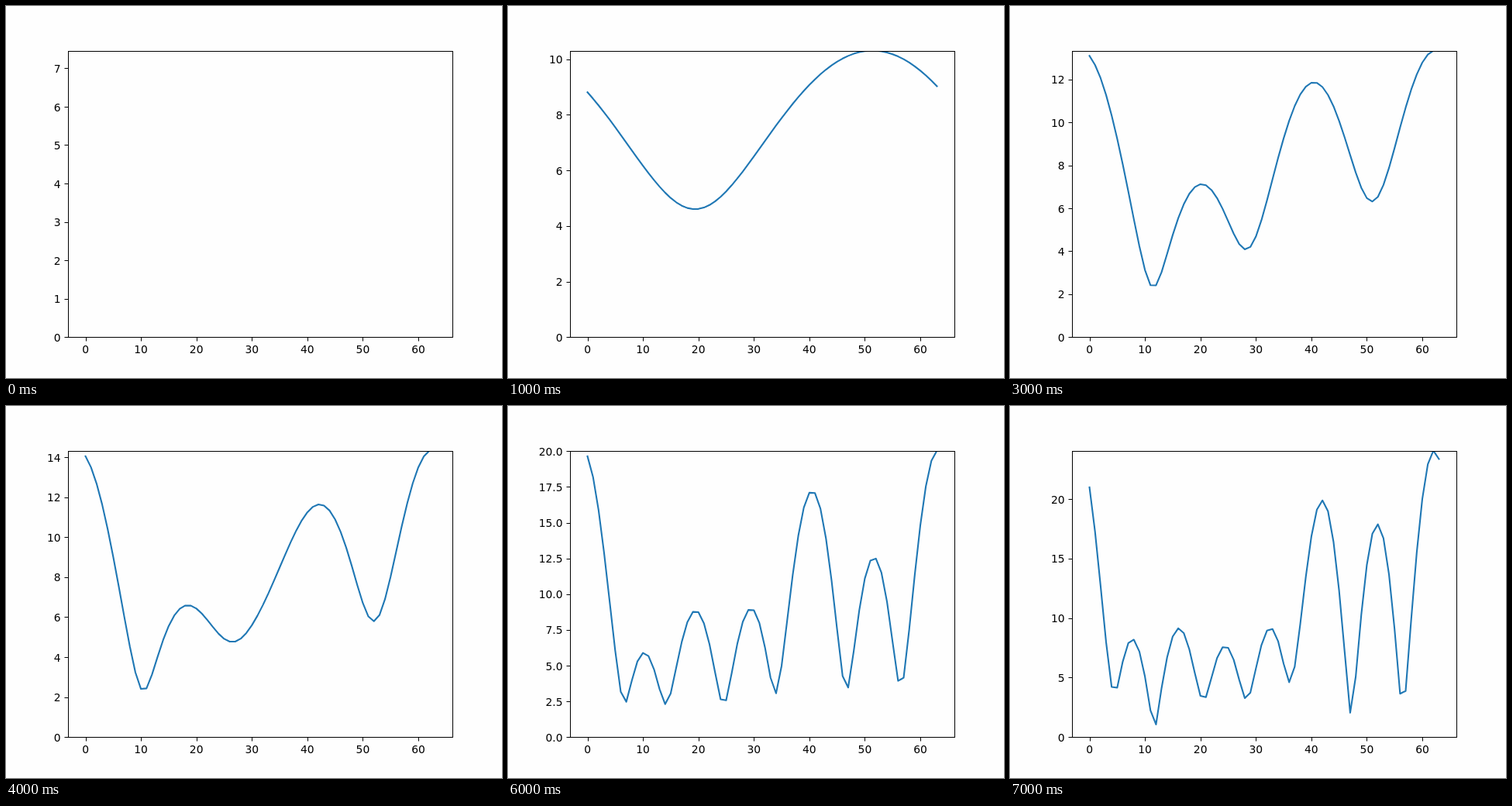
These frames come from a looping animation (640x480 px, 8000 ms). An HTML page:

```html
<!DOCTYPE html>
<html lang="en">
<head>
<meta charset="utf-8">
<title>Growing spectrum</title>
<style>
  html, body { margin: 0; width: 100%; height: 100%; overflow: hidden; background: #fefefe; }
  svg { display: block; width: 640px; height: 480px; }
  text { font: 13.889px "DejaVu Sans", sans-serif; fill: #000; }
  .axis { fill: none; stroke: #000; stroke-width: 1; }
  .curve { fill: none; stroke: #1f77b4; stroke-width: 2.083; stroke-linejoin: round; stroke-linecap: square; }
  .step { visibility: hidden; animation: show 8s step-end infinite; }
  @keyframes show {
    0% { visibility: visible; }
    12.5%, 100% { visibility: hidden; }
  }
</style>
</head>
<body>
<svg id="plot" viewBox="0 0 640 480">
  <clipPath id="area"><rect x="80" y="58" width="496" height="369"/></clipPath>
</svg>
<script>
const LEFT = 80, RIGHT = 576, TOP = 57.6, BOTTOM = 427.2;
const POINTS = 64, TICK = 5;

// Complex samples [re, im]; each second one more enters the padded DFT.
const samples = [
  [7.46, 0], [0.932, -2.698], [1.15, -0.157], [2.795, -1.54],
  [0.77, -0.653], [2.115, 0.634], [2.678, -3.678], [-1.635, -5.168]
];

const plot = document.getElementById('plot');
const snap = v => Math.round(v) + 0.5;
const xAt = k => LEFT + (RIGHT - LEFT) * (0.5 + k / (POINTS - 1)) / 11 * 10 / 1
  - (RIGHT - LEFT) * (0.5 * 10 / 11 - 0.5 / 11);

function add(parent, tag, attrs, text) {
  const el = document.createElementNS('http://www.w3.org/2000/svg', tag);
  for (const name in attrs) el.setAttribute(name, attrs[name]);
  if (text !== undefined) el.textContent = text;
  parent.appendChild(el);
  return el;
}

function magnitude(k, count) {
  let re = 0, im = 0;
  for (let m = 0; m < count; m++) {
    const angle = -2 * Math.PI * k * m / POINTS;
    const c = Math.cos(angle), s = Math.sin(angle);
    re += samples[m][0] * c - samples[m][1] * s;
    im += samples[m][0] * s + samples[m][1] * c;
  }
  return Math.hypot(re, im);
}

// Smallest round step that gives at most nine intervals.
const tickStep = max => [1, 2, 2.5, 5, 10].find(step => step >= max / 9);

function drawStep(count) {
  const group = add(plot, 'g', { class: 'step', style: `animation-delay:${count - 1}s` });
  const values = Array.from({ length: POINTS }, (_, k) => magnitude(k, count));
  const max = Math.max(...values);
  const yAt = v => BOTTOM - (BOTTOM - TOP) * v / max;

  const points = values.map((v, k) => `${xAt(k).toFixed(2)},${yAt(v).toFixed(2)}`).join(' ');
  add(group, 'polyline', { class: 'curve', points, 'clip-path': 'url(#area)' });

  const step = tickStep(max);
  for (let v = 0; v <= max; v += step) {
    const y = yAt(v);
    add(group, 'path', { class: 'axis', d: `M${LEFT - TICK + 0.5} ${snap(y)}H${LEFT + 0.5}` });
    add(group, 'text', { x: 70.6, y: Math.round(y + 5.6), 'text-anchor': 'end' },
      step % 1 ? v.toFixed(1) : v);
  }
}

for (let count = 1; count <= samples.length; count++) drawStep(count);

add(plot, 'rect', {
  class: 'axis', x: snap(LEFT), y: snap(TOP),
  width: RIGHT - LEFT, height: snap(BOTTOM) - snap(TOP)
});
for (let k = 0; k <= 60; k += 10) {
  const x = xAt(k);
  add(plot, 'path', { class: 'axis', d: `M${snap(x)} ${snap(BOTTOM)}v${TICK}` });
  add(plot, 'text', { x: x.toFixed(2), y: 448, 'text-anchor': 'middle' }, k);
}
</script>
</body>
</html>
```
